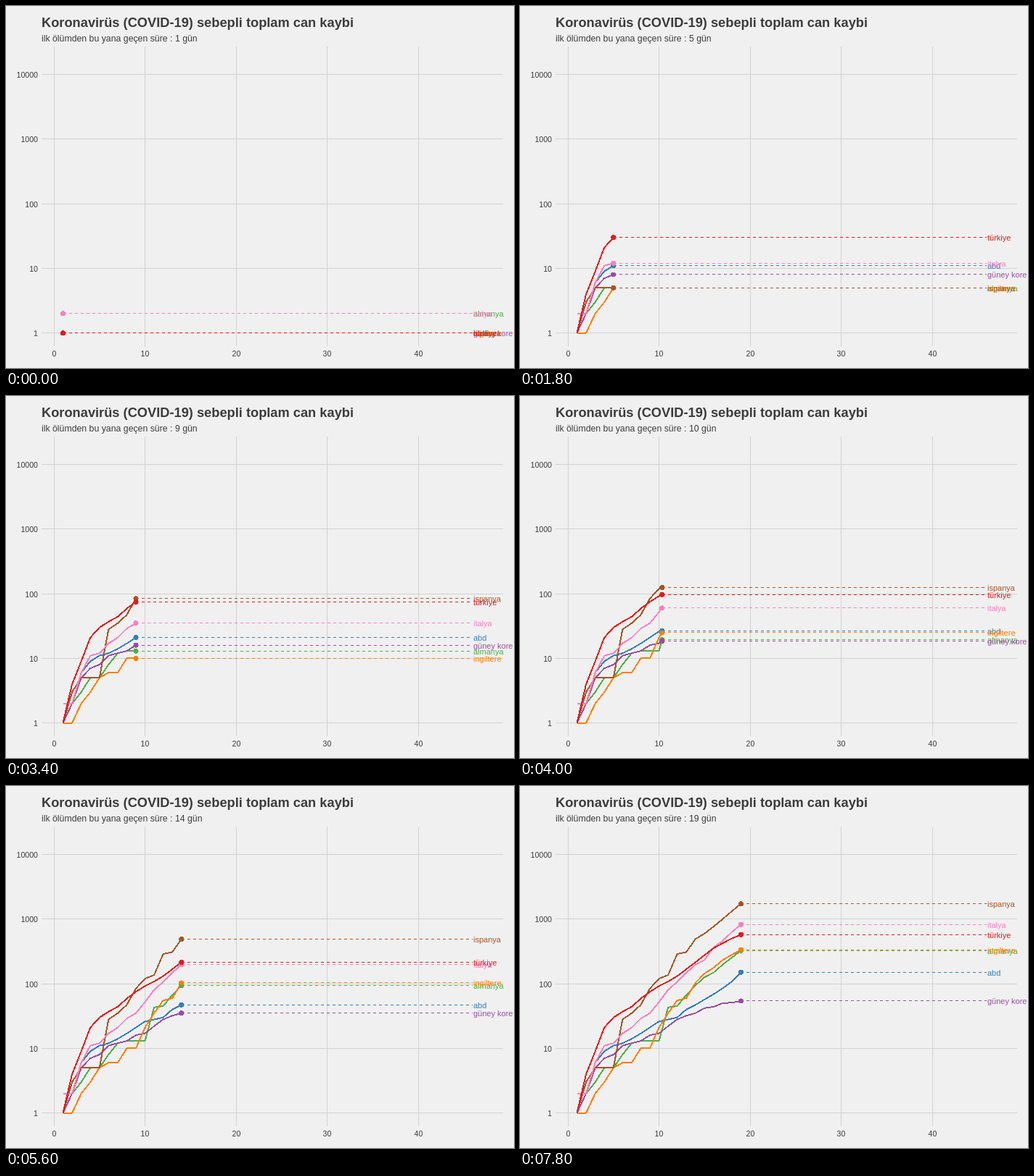
Animation, 700 px wide and 500 px high, one loop 8 s. Source, as an HTML page:

```html
<!DOCTYPE html>
<html lang="tr">
<head>
<meta charset="utf-8">
<style>
  html, body { margin: 0; width: 100%; height: 100%; overflow: hidden; background: #f0f0f0; }
  svg { display: block; font-family: "Liberation Sans", Arial, sans-serif; fill: #3c3c3c; }
  path, line, circle { shape-rendering: crispEdges; }
  .grid { stroke: #d2d2d2; }
  .axis { font-size: 10.6px; }
  .curve { fill: none; stroke-width: 2; stroke-linejoin: round; }
  .lead { stroke-dasharray: 4 4; }
  .label { font-size: 11px; }
</style>
</head>
<body>
<svg id="chart" width="700" height="500" viewBox="0 0 700 500">
  <text x="49" y="29" font-size="18.25" font-weight="bold">Koronavirüs (COVID-19) sebepli toplam can kaybi</text>
  <text id="subtitle" x="49" y="49" font-size="12.3"></text>
</svg>
<script>
const STEP = 200, STEPS = 40;
const FULL_STEPS = 99, FULL_DAYS = 46; // the complete reveal spans 47 days in 100 steps

// Cumulative deaths per day, in drawing order
const series = [
  { name: 'abd', color: '#377eb8', deaths: [1, 2, 6, 9, 11, 12, 14, 17, 21, 26, 28, 30, 40, 47, 57, 69, 85, 108, 150] },
  { name: 'almanya', color: '#4daf4a', deaths: [2, 2, 3, 5, 5, 8, 12, 13, 13, 13, 43, 45, 67, 94, 126, 149, 198, 253, 325] },
  { name: 'güney kore', color: '#984ea3', deaths: [1, 2, 5, 7, 8, 11, 12, 13, 16, 17, 22, 28, 32, 35, 42, 44, 50, 51, 54] },
  { name: 'ingiltere', color: '#ff7f00', deaths: [1, 1, 2, 3, 5, 6, 6, 10, 10, 21, 35, 55, 60, 103, 144, 177, 233, 281, 335] },
  { name: 'ispanya', color: '#a65628', deaths: [1, 3, 5, 5, 5, 28, 35, 47, 84, 120, 136, 288, 309, 491, 598, 767, 1002, 1326, 1720] },
  { name: 'italya', color: '#f781bf', deaths: [2, 2, 6, 11, 12, 17, 21, 29, 35, 52, 80, 107, 148, 197, 233, 366, 463, 631, 827] },
  { name: 'türkiye', color: '#e41a1c', deaths: [1, 4, 9, 21, 30, 37, 44, 59, 75, 92, 108, 131, 168, 214, 277, 356, 425, 501, 574] },
];

const chart = document.getElementById('chart');
const subtitle = document.getElementById('subtitle');
const xOf = day => 66 + 12.55 * day;
const yOf = count => 451.6 - 89.25 * Math.log10(count);
const snap = v => Math.floor(v) + 0.5;

function set(node, attrs) {
  for (const key in attrs) node.setAttribute(key, attrs[key]);
  return node;
}
function add(tag, attrs, text = '') {
  const node = set(document.createElementNS(chart.namespaceURI, tag), attrs);
  node.textContent = text;
  return chart.appendChild(node);
}

for (let day = 0; day <= 40; day += 10) {
  const x = snap(xOf(day));
  add('line', { class: 'grid', x1: x, x2: x, y1: 56, y2: 470 });
  add('text', { class: 'axis', x, y: 484, 'text-anchor': 'middle' }, day);
}
for (let count = 1; count <= 10000; count *= 10) {
  const y = snap(yOf(count));
  add('line', { class: 'grid', x1: 49, x2: 685, y1: y, y2: y });
  add('text', { class: 'axis', x: 44, y: y + 4.5, 'text-anchor': 'end' }, count);
}

// One layer per kind of mark, so that all points lie above all lines
const layer = make => series.map(make);
const curves = layer(s => add('path', { class: 'curve', stroke: s.color }));
const leads = layer(s => add('line', { class: 'lead', stroke: s.color, x2: xOf(46) }));
const dots = layer(s => add('circle', { r: 3.5, fill: s.color }));
const labels = layer(s => add('text', { class: 'label', fill: s.color, x: 644 }, s.name));

const stepOfDay = day => Math.round((day - 1) * FULL_STEPS / FULL_DAYS);

// Days are pinned to whole steps, with even motion between them
function dayAt(step) {
  let day = 1;
  while (stepOfDay(day + 1) <= step) day++;
  const start = stepOfDay(day);
  return day + (step - start) / (stepOfDay(day + 1) - start);
}

function draw(step) {
  const now = dayAt(step), whole = Math.floor(now), part = now - whole;
  const x = xOf(now);
  subtitle.textContent =
    `ilk ölümden bu yana geçen süre : ${Math.round(1 + step * FULL_DAYS / FULL_STEPS)} gün`;
  series.forEach(({ deaths }, i) => {
    const from = yOf(deaths[whole - 1]);
    const y = part ? from + (yOf(deaths[whole]) - from) * part : from;
    const points = deaths.slice(0, whole).map((count, d) => [xOf(d + 1), yOf(count)]);
    points.push([x, y]);
    set(curves[i], { d: 'M' + points.join('L') });
    set(leads[i], { x1: x, y1: snap(y), y2: snap(y) });
    set(dots[i], { cx: x, cy: y });
    set(labels[i], { y: Math.round(y + 4.5) });
  });
}

const origin = performance.now();
let shown = -1;
function tick() {
  const step = Math.floor((performance.now() - origin) / STEP) % STEPS;
  if (step !== shown) draw(shown = step);
  requestAnimationFrame(tick);
}
tick();
</script>
</body>
</html>
```
